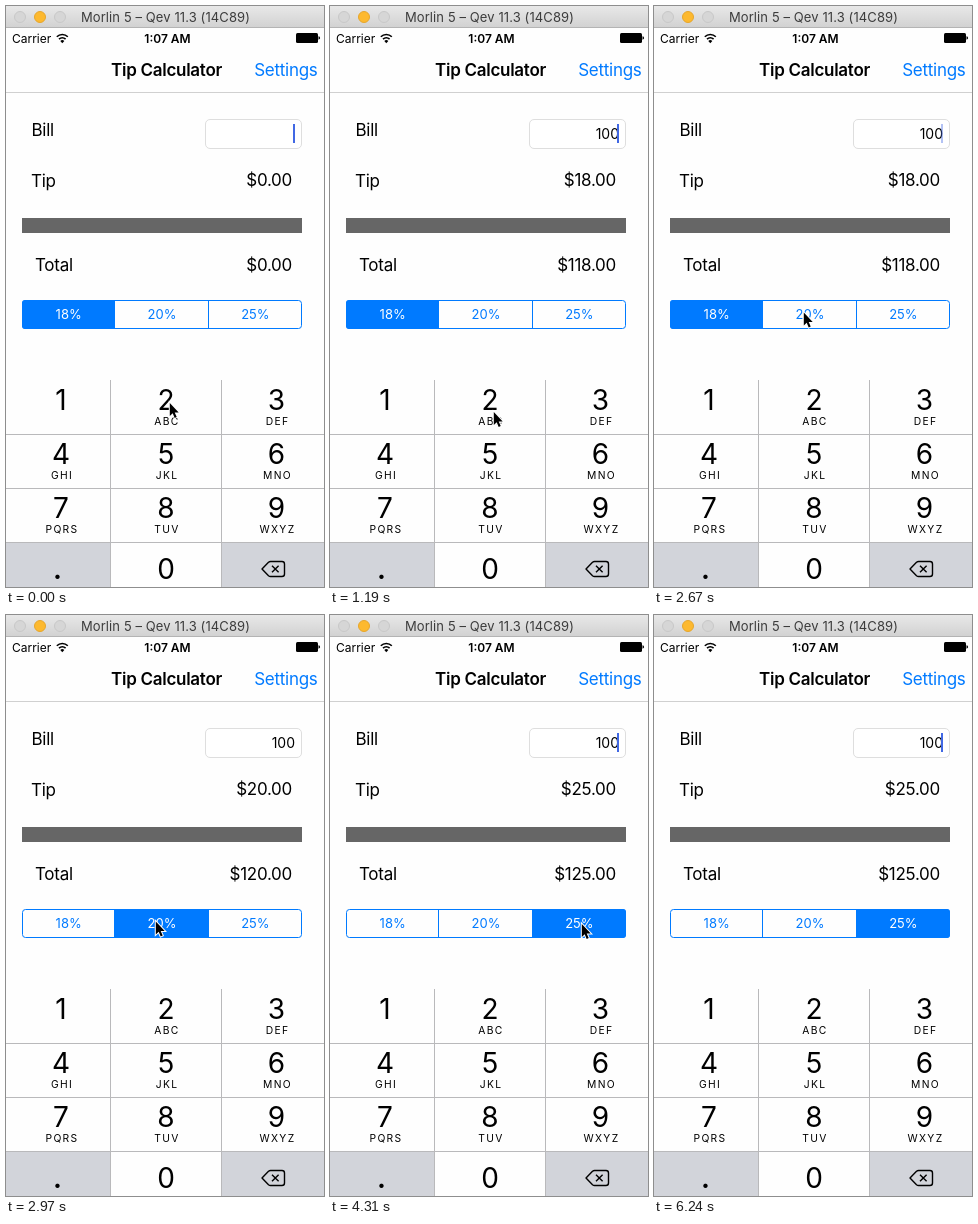
These frames come from a looping animation (318 by 581 pixels, 6340 ms). An HTML page:

```html
<!DOCTYPE html>
<html lang="en">
<head>
<meta charset="utf-8">
<title>Tip Calculator</title>
<style>
  html, body { margin: 0; width: 100%; height: 100%; overflow: hidden; background: #fff; }
  svg { display: block; width: 318px; height: 581px; font-family: Inter, Roboto, sans-serif; }
  .body { font-size: 17px; letter-spacing: -.28px; }
  .end { text-anchor: end; }
  .mid { text-anchor: middle; }
  .digit { font-size: 28px; }
  .letters { font-size: 10.3px; letter-spacing: 1.35px; }
  .blue { fill: #007aff; }
</style>
</head>
<body>
<svg viewBox="0 0 318 581">
  <defs>
    <linearGradient id="chrome" x2="0" y2="1">
      <stop stop-color="#e8e8e8"/><stop offset="1" stop-color="#d2d2d2"/>
    </linearGradient>
    <clipPath id="round"><rect x="16" y="294" width="280" height="29" rx="3"/></clipPath>
  </defs>
  <rect width="318" height="581" fill="#fefefe"/>

  <rect width="318" height="21" fill="url(#chrome)"/>
  <rect y="21" width="318" height="1" fill="#b4b4b4"/>
  <g fill="#d6d6d6" stroke="#c8c8c8">
    <circle cx="14" cy="11" r="5.5"/>
    <circle cx="34" cy="11" r="5.5" fill="#fdb92f" stroke="#e6a62c"/>
    <circle cx="54" cy="11" r="5.5"/>
  </g>
  <text class="mid" x="159.5" y="16" font-size="13" letter-spacing=".1" fill="#3c3c3c">Morlin 5 – Qev 11.3 (14C89)</text>

  <text x="6" y="36.5" font-size="12">Carrier</text>
  <g fill="none" stroke="#000" stroke-width="1.6">
    <path d="M50.8 30.8a7.7 7.7 0 0 1 11 0M53 33.2a4.8 4.8 0 0 1 6.6 0"/>
    <path d="M54.3 35a3 3 0 0 1 4 0L56.3 37.2Z" fill="#000" stroke="none"/>
  </g>
  <text class="mid" x="161.5" y="36.5" font-size="12" font-weight="600">1:07 AM</text>
  <rect x="290" y="27" width="22" height="10" rx="1.5"/>
  <path d="M312.5 30.3q1.6 .3 1.6 1.7t-1.6 1.7Z"/>

  <text class="body mid" x="160.5" y="70" font-weight="600">Tip Calculator</text>
  <text class="body end blue" x="311.5" y="70">Settings</text>
  <rect y="86" width="318" height="1" fill="#d0d0d0"/>

  <g class="body">
    <text x="25.5" y="130">Bill</text>
    <text x="25" y="181">Tip</text>
    <text x="29" y="265">Total</text>
    <text id="tip" class="end" x="286" y="180"></text>
    <text id="total" class="end" x="286" y="265"></text>
  </g>
  <rect x="199.5" y="113.5" width="96" height="29" rx="4.5" fill="#fff" stroke="#dedede"/>
  <text id="bill" class="end" x="289" y="133" font-size="14"></text>
  <rect id="caret" x="287" y="118" width="2" height="19" fill="#4168e4"/>
  <rect x="16" y="212" width="280" height="15" fill="#666"/>

  <g id="segments"></g>
  <g id="pad"></g>

  <path id="cursor" d="M.3 .5V13.4L3.2 10.8 5.2 15.5 7.2 14.6 5.2 10H9.2Z" stroke="#fff" stroke-width="2" paint-order="stroke"/>
</svg>
<script>
const LOOP = 6340;
const STEP = 148.4; // the screen refreshes in steps of this many ms
const $ = id => document.getElementById(id);
const clamp = (v, lo = 0, hi = 1) => Math.min(hi, Math.max(lo, v));
const ease = u => u * u * (3 - 2 * u);

const rates = [18, 20, 25];
const segment = 280 / rates.length;
const home = [163.5, 396.5];
// Pointer glides, in steps: begin, end, x, y. The last one leaves the stage.
const glides = [
  [0, 2, 163.5, 405.5],
  [10, 13, 83.5, 508],
  [13, 18, 149.5, 306],
  [23, 26, 251.5, 308.5],
  [34, 36, 347, 564]
];

function buildSegments() {
  const left = i => Math.floor(16 + i * segment);
  const fills = rates.map((r, i) =>
    `<rect class="blue" x="${left(i)}" y="294" width="${left(i + 1) - left(i)}" height="29"/>`);
  const labels = rates.map((r, i) =>
    `<text class="mid" x="${16 + (i + .5) * segment}" y="313" font-size="13">${r}%</text>`);
  $('segments').innerHTML = `<g clip-path="url(#round)">${fills.join('')}</g>
    <path d="M108.5 294V323M202.5 294V323" stroke="#007aff"/>
    <rect x="16.5" y="294.5" width="279" height="28" rx="3" fill="none" stroke="#007aff"/>
    ${labels.join('')}`;
}

function buildPad() {
  const columns = [55, 160, 270.5];
  const letters = ['', 'ABC', 'DEF', 'GHI', 'JKL', 'MNO', 'PQRS', 'TUV', 'WXYZ'];
  const keys = letters.map((word, i) => {
    const x = columns[i % 3], y = 404 + 54 * Math.floor(i / 3);
    return `<text class="digit mid" x="${x}" y="${y}">${i + 1}</text>
      <text class="letters mid" x="${x + 1}" y="${y + 15}">${word}</text>`;
  });
  $('pad').innerHTML = `
    <path d="M0 537H104V581H0ZM216 537H318V581H216Z" fill="#d2d4da"/>
    <path d="M104.5 374V581M215.5 374V581M0 428.5H318M0 482.5H318M0 536.5H318" stroke="#b9b9bb"/>
    ${keys.join('')}
    <text class="digit mid" x="160" y="573">0</text>
    <text class="digit mid" x="51.5" y="572.5" font-weight="600">.</text>
    <g fill="none" stroke="#000" stroke-width="1.4" stroke-linejoin="round">
      <path d="M256 563L262.5 556.3Q263.5 555.5 264.5 555.5H276Q278.5 555.5 278.5 558V568Q278.5 570.5 276 570.5H264.5Q263.5 570.5 262.5 569.7Z"/>
      <path d="M266 559.7L272.6 566.3M272.6 559.7L266 566.3"/>
    </g>`;
}

buildSegments();
buildPad();
const fills = document.querySelectorAll('#segments g rect');
const labels = document.querySelectorAll('#segments text');
const money = n => '$' + n.toFixed(2);

// The caret blinks once a second, stays solid while typing, then starts afresh.
function caretOpacity(now, typing) {
  const age = typing ? Math.max(0, now - 1375) : now + 100;
  const away = Math.abs(age - 1000 * Math.round(age / 1000));
  return clamp((380 - away) / 210);
}

function pointerAt(step) {
  return glides.reduce(([px, py], [begin, end, x, y]) => {
    const u = ease(clamp((step - begin) / (end - begin)));
    return [px + (x - px) * u, py + (y - py) * u];
  }, home);
}

function draw(t) {
  const step = Math.floor((t + 3) / STEP);
  const typed = clamp(Math.floor((step - 5) / 1.5) + 1, 0, 3);
  const bill = '100'.slice(0, typed);
  const pick = (step >= 20) + (step >= 29);
  const tip = bill * rates[pick] / 100;
  $('bill').textContent = bill;
  $('tip').textContent = money(tip);
  $('total').textContent = money(+bill + tip);
  $('caret').setAttribute('opacity', caretOpacity(step * STEP, typed > 0));
  rates.forEach((r, i) => {
    fills[i].setAttribute('opacity', i === pick ? 1 : 0);
    labels[i].setAttribute('fill', i === pick ? '#fff' : '#007aff');
  });
  $('cursor').setAttribute('transform', `translate(${pointerAt(step)})`);
}

const begin = performance.now();
function tick() {
  draw((performance.now() - begin) % LOOP);
  requestAnimationFrame(tick);
}
tick();
</script>
</body>
</html>
```
